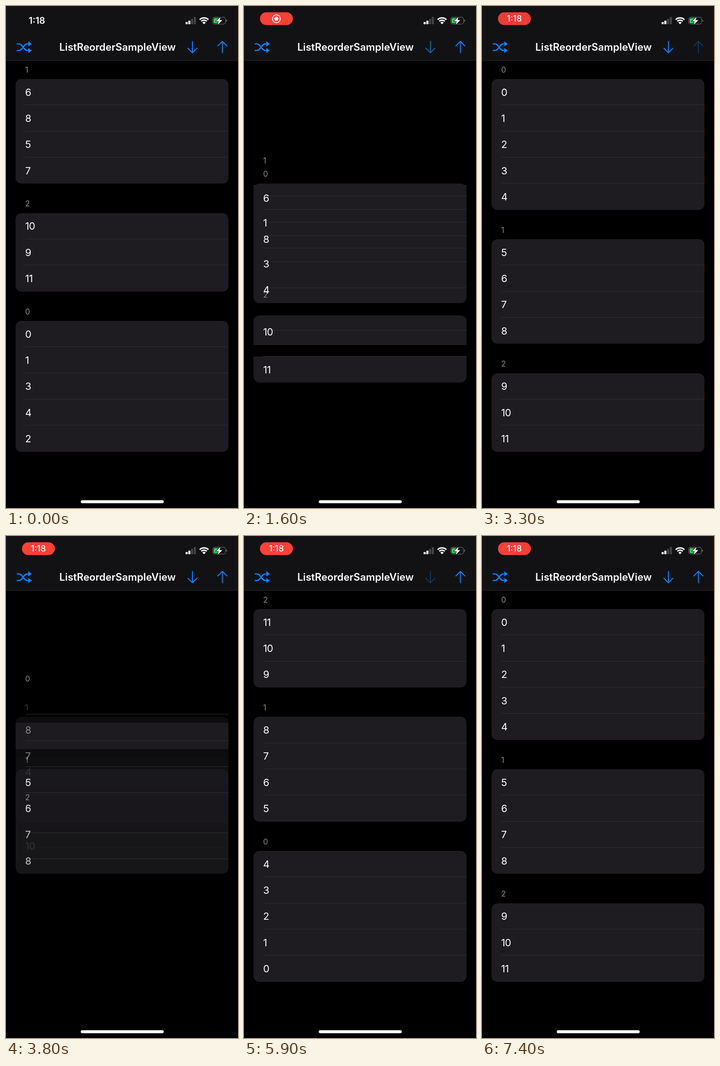
An HTML page with a canvas for the animation above (7500 ms loop, 509 px wide and 1100 px high).

```html
<!DOCTYPE html>
<html lang="en">
<head>
<meta charset="utf-8">
<title>List reorder</title>
<style>
  html, body { margin: 0; width: 100%; height: 100%; overflow: hidden; background: #000; }
  canvas { display: block; width: 509px; height: 1100px; }
</style>
</head>
<body>
<canvas id="stage" width="509" height="1100"></canvas>
<script>
const ctx = document.getElementById('stage').getContext('2d');
const LOOP = 7500, STEP = 100, MOVE_TIME = 300;
const ROW = 57.33, LEFT = 21, RIGHT = 488, INSET = 42, RADIUS = 13;
const CARD = '#1e1c20', LINE = '#302f33', BLUE = '#0a84ff', GRAY = '#8b8b90';

const clamp = v => Math.max(0, Math.min(1, v));
const mix = (a, b, p) => a + (b - a) * p;
const smooth = v => v * v * (3 - 2 * v);
const span = (t, start, length) => clamp((t - start) / length);

// Turns an ordered list of [section, items] into positions of rows, headers and separators.
function layout(sections) {
  const cells = {}, headers = {}, lines = {};
  let y = 160;
  for (const [section, items] of sections) {
    headers[section] = y - 20.7;
    lines[section] = items.slice(1).map((_, i) => y + ROW * (i + 1));
    items.forEach((item, i) => {
      cells[item] = { y: y + ROW * i, section, first: i === 0, last: i === items.length - 1 };
    });
    y += ROW * items.length + 64.4;
  }
  return { cells, headers, lines };
}

const shuffled = layout([[1, [6, 8, 5, 7]], [2, [10, 9, 11]], [0, [0, 1, 3, 4, 2]]]);
const ascending = layout([[0, [0, 1, 2, 3, 4]], [1, [5, 6, 7, 8]], [2, [9, 10, 11]]]);
const descending = layout([[2, [11, 10, 9]], [1, [8, 7, 6, 5]], [0, [4, 3, 2, 1, 0]]]);

const LOWER = [0, 5, 7, 2, 9], UPPER = [1, 3, 4, 6, 8, 10, 11];
const INNER = [5, 6, 7, 8], OUTER = [0, 1, 2, 3, 4, 9, 10, 11];

function text(str, x, y, size, color, weight = 400, align = 'left', spacing = 0) {
  ctx.font = `${weight} ${size}px Inter, "Liberation Sans", sans-serif`;
  ctx.letterSpacing = `${spacing}px`;
  ctx.textAlign = align;
  ctx.fillStyle = color;
  ctx.fillText(str, x, y);
}

function box(x, y, w, h, color, radii = 0) {
  ctx.fillStyle = color;
  ctx.beginPath();
  ctx.roundRect(x, y, w, h, radii);
  ctx.fill();
}

function stroke(path, color, width) {
  ctx.strokeStyle = color;
  ctx.lineWidth = width;
  ctx.stroke(new Path2D(path));
}

function shape(path, color) {
  ctx.fillStyle = color;
  ctx.fill(new Path2D(path));
}

function withAlpha(alpha, draw) {
  if (alpha <= 0) return;
  ctx.save();
  ctx.globalAlpha *= alpha;
  draw();
  ctx.restore();
}

function cellBox(y, first, last) {
  const top = Math.round(y), a = first ? RADIUS : 0, b = last ? RADIUS : 0;
  box(LEFT, top, RIGHT - LEFT, Math.round(y + ROW) - top, CARD, [a, a, b, b]);
}

const cellLabel = (item, y) => text(item, INSET, y + ROW / 2 + 8, 22, '#fff', 400, 'left', -0.6);
const header = (section, y) => text(section, INSET, y + 6.2, 17, GRAY);
const separator = y => box(INSET, Math.round(y) - 1, RIGHT - INSET, 1, LINE);

function movingList(from, to, p) {
  const rowY = item => mix(from.cells[item].y, to.cells[item].y, p);
  const drawBox = item => cellBox(rowY(item), to.cells[item].first, to.cells[item].last);
  for (const item of LOWER) {
    drawBox(item);
    cellLabel(item, rowY(item));
  }
  UPPER.forEach(drawBox);
  for (const s of [0, 1, 2]) from.lines[s].forEach((y, i) => separator(mix(y, to.lines[s][i], p)));
  for (const s of [0, 1, 2]) header(s, mix(from.headers[s], to.headers[s], p));
  for (const item of UPPER) cellLabel(item, rowY(item));
}

// Outer sections swap places while the middle one cross-fades.
function reversingList(from, to, p) {
  const rowY = item => mix(from.cells[item].y, to.cells[item].y, p);
  const rowAlpha = item => Math.abs(1 - 2 * p) ** (item === 4 || item === 10 ? 2 : 6);
  const fades = [[from, (1 - p) ** 0.7], [to, p ** 0.7]];

  cellBox(rowY(0), false, false);
  for (const item of OUTER.slice(1)) {
    const { first, last } = (p < 0.5 ? from : to).cells[item];
    withAlpha(rowAlpha(item), () => cellBox(rowY(item), first, last));
  }
  for (const [state, alpha] of fades) withAlpha(alpha, () => {
    for (const item of INNER) cellBox(state.cells[item].y, state.cells[item].first, state.cells[item].last);
  });
  for (const [state, alpha] of fades) withAlpha(alpha * alpha * 0.5, () => state.lines[1].forEach(separator));
  for (const s of [0, 2]) {
    from.lines[s].forEach((y, i) => separator(mix(y, to.lines[s][i], p)));
    header(s, mix(from.headers[s], to.headers[s], p));
  }
  for (const item of OUTER) withAlpha(rowAlpha(item), () => cellLabel(item, rowY(item)));
  for (const [state, alpha] of fades) withAlpha(alpha, () => {
    header(1, state.headers[1]);
    for (const item of INNER) cellLabel(item, state.cells[item].y);
  });
}

const moves = [
  { start: 1436.3, from: shuffled, to: ascending, draw: movingList },
  { start: 3685, from: ascending, to: descending, draw: reversingList },
  { start: 5985, from: descending, to: ascending, draw: reversingList }
];

function list(t) {
  const move = moves.findLast(m => t >= m.start) || moves[0];
  const p = smooth(span(t, move.start, MOVE_TIME));
  if (p === 0 || p === 1) {
    const rest = p ? move.to : move.from;
    movingList(rest, rest, 0);
  } else {
    move.draw(move.from, move.to, p);
  }
}

function pressed(t, down, up) {
  return t < down ? 1 : mix(0.35, 1, span(t, up, 350));
}

function arrow(x, direction, alpha) {
  withAlpha(alpha, () => {
    const tip = 90 + 12.5 * direction, tail = 90 - 12.5 * direction, wing = tip - 10 * direction;
    stroke(`M${x} ${tail}V${tip}M${x - 10} ${wing}L${x} ${tip}L${x + 10} ${wing}`, BLUE, 2);
  });
}

function shuffleIcon() {
  stroke('M24.5 83H28C37 83 38 97.5 47 97.5H51M24.5 97.5H28C37 97.5 38 83 47 83H51', BLUE, 2.7);
  for (const y of [83, 97.5]) shape(`M49 ${y - 5.8}L56.5 ${y}L49 ${y + 5.8}Z`, BLUE);
}

function statusIcons() {
  [5, 8, 12, 16].forEach((h, i) => box(394 + i * 6, 40 - h, 4.6, h, i < 2 ? '#fff' : '#454548', 1.2));

  ctx.strokeStyle = '#fff';
  ctx.lineWidth = 3.2;
  ctx.lineCap = 'butt';
  for (const r of [13.5, 8.5]) {
    ctx.beginPath();
    ctx.arc(434.5, 39.5, r, -Math.PI * 0.75, -Math.PI * 0.25);
    ctx.stroke();
  }
  shape('M434.5 40L430.8 36.2Q434.5 33 438.2 36.2Z', '#fff');
  ctx.lineCap = 'round';

  ctx.strokeStyle = '#69696c';
  ctx.lineWidth = 1.2;
  ctx.beginPath();
  ctx.roundRect(453.6, 24.6, 28, 15, 4.5);
  ctx.stroke();
  box(483, 29.5, 2, 5, '#69696c', [0, 2, 2, 0]);
  box(455.5, 26.5, 14, 11.2, '#30d158', 2.5);
  const bolt = 'M470.5 24L460.5 33.5H466.5L464.5 41L474.5 31H468.5Z';
  stroke(bolt, '#121214', 2);
  shape(bolt, '#fff');
}

function clock(t) {
  const shown = span(t, 150, 250), timed = span(t, 2850, 300);
  withAlpha(1 - shown, () => text('1:18', 67.8, 39.4, 20, '#fff', 600, 'center'));
  withAlpha(shown, () => {
    const glow = 0.94 + 0.06 * Math.cos((t - 3900) / 1950 * 2 * Math.PI);
    withAlpha(glow, () => box(35, 13.8, 72.3, 28, '#ff4238', 14));
    withAlpha(1 - timed, () => {
      ctx.strokeStyle = '#fff';
      ctx.lineWidth = 1.8;
      ctx.beginPath();
      ctx.arc(71, 28, 8.6, 0, 7);
      ctx.stroke();
      box(66.5, 23.5, 9, 9, '#fff', 4.5);
    });
    withAlpha(timed, () => text('1:18', 71, 34.4, 18.5, '#fff', 500, 'center'));
  });
}

function navigation(t) {
  box(0, 0, 509, 119, '#121214');
  box(0, 119, 509, 1, '#222224');
  statusIcons();
  clock(t);
  shuffleIcon();
  text('ListReorderSampleView', 244.7, 98, 22.2, '#fff', 600, 'center');
  arrow(409, 1, t < 4000 ? pressed(t, 1250, 1400) : pressed(t, 5800, 5950));
  arrow(474.7, -1, pressed(t, 3200, 3350));
}

function render(now) {
  const t = Math.floor(now % LOOP / STEP) * STEP;
  ctx.lineCap = ctx.lineJoin = 'round';
  box(0, 0, 509, 1100, '#000');
  list(t);
  navigation(t);
  box(164, 1083, 182, 6.5, '#fff', 3.25);
}

let began;
function tick(now) {
  began ??= now;
  render(now - began);
  requestAnimationFrame(tick);
}
requestAnimationFrame(tick);
</script>
</body>
</html>
```
